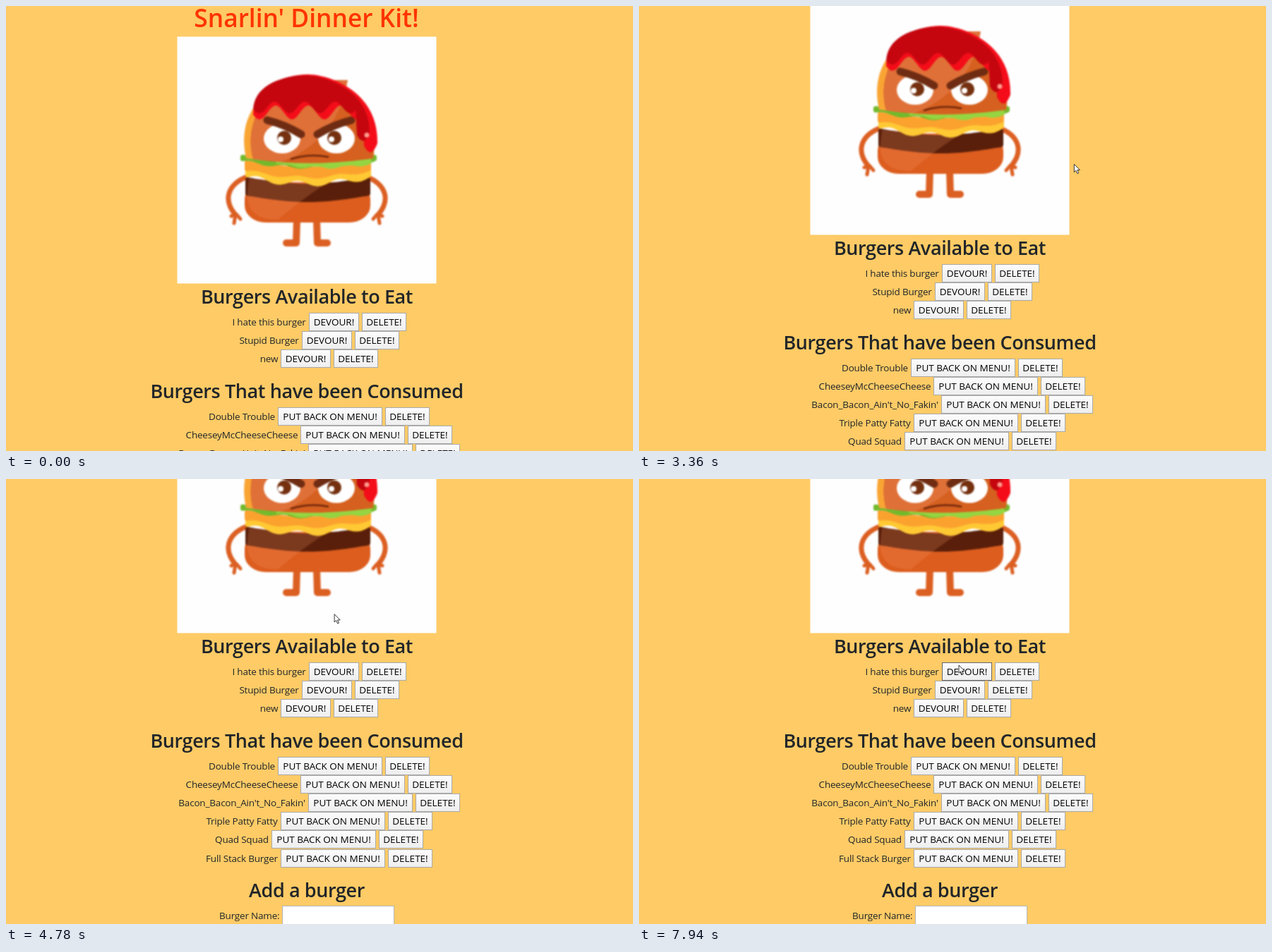
Write an HTML page that moves like this. It is 888 px wide and 631 px high and loops after 8000 ms.

```html
<!DOCTYPE html>
<html lang="en">
<head>
<meta charset="utf-8">
<title>Burger menu</title>
<style>
  html, body { margin: 0; width: 100%; height: 100%; overflow: hidden; background: #fecb66; }
  svg { display: block; width: 888px; height: 631px; }
  text { font: 13.5px "Open Sans", "Noto Sans", sans-serif; fill: #212529; }
  .label { letter-spacing: -.2px; }
  .head { font-size: 27px; font-weight: 600; letter-spacing: -.4px; text-anchor: middle; }
  .title { font-size: 35.3px; font-weight: 600; fill: #ff3300; text-anchor: middle; }
  .caption { fill: #000; text-anchor: middle; pointer-events: none; }
  .button { fill: url(#face); stroke: #a9a9a9; }
  .button.hover { stroke: #666; }
  #burger { filter: blur(.8px); }
  #bands path { stroke-width: 6; stroke-linejoin: round; }
  #cursor { pointer-events: none; }
  .line { fill: none; stroke-linecap: round; stroke-linejoin: round; }
</style>
</head>
<body>
<svg viewBox="0 0 888 631">
  <defs>
    <linearGradient id="face" x2="0" y2="1">
      <stop stop-color="#fcfcfc"/><stop offset="1" stop-color="#eeeeee"/>
    </linearGradient>
    <g id="limbs" class="line" stroke="#dc5f22">
      <path stroke-width="7" d="M339 243C314 254 307 275 325 296"/>
      <path stroke-width="5" d="M325 295L319 298M325 296L323 308M327 296L332 302"/>
      <path stroke-width="10" d="M412 303L411 336H397"/>
    </g>
    <g id="eye">
      <ellipse cx="391" cy="188" rx="26" ry="21" fill="#fff"/>
      <circle cx="394" cy="187" r="10" fill="#74300f"/>
      <path class="line" stroke="#6f2c12" stroke-width="11" d="M370 162Q395 168 418 182"/>
    </g>
  </defs>
  <g id="page">
    <text class="title" x="425.5" y="30">Snarlin' Dinner Kit!</text>
    <rect x="242.5" y="43.5" width="367" height="350" fill="#fefefe"/>
    <g id="burger">
      <use href="#limbs"/><use href="#limbs" transform="matrix(-1 0 0 1 852 0)"/>
      <rect x="338" y="250" width="178" height="57" rx="30" ry="24" fill="#dc5d1e"/>
      <g id="bands"></g>
      <path d="M340 216C325 150 370 105 430 105S530 150 520 216Q430 229 340 216Z" fill="#f9a534"/>
      <path d="M350 217C335 165 370 105 430 105S530 150 520 216Q430 229 350 217Z" fill="#d5601f"/>
      <path d="M350 217C335 165 370 105 430 105H484Q470 190 390 221Z" fill="#df7038"/>
      <use href="#eye"/><use href="#eye" transform="matrix(-1 0 0 1 859 0)"/>
      <g fill="#fff"><circle cx="389" cy="189" r="4"/><circle cx="461" cy="189" r="4"/></g>
      <path class="line" stroke="#70270c" stroke-width="2.5" d="M404 217Q430 209 456 214"/>
      <path id="sauce" fill="#f40d19"/>
      <use href="#glaze"/>
      <circle cx="511" cy="183" r="3.5" fill="#ff9a8c"/>
    </g>
    <text class="head" x="426" y="422">Burgers Available to Eat</text>
    <text class="head" x="426" y="555.5">Burgers That have been Consumed</text>
    <text class="head" x="426" y="767.5">Add a burger</text>
    <text class="label" x="302" y="798.5">Burger Name:</text>
    <rect x="391.5" y="780.5" width="158" height="26" fill="#fff" stroke="#b5b5b5"/>
  </g>
  <g id="cursor">
    <path id="arrow" d="M.5 .5V11.8L3 9.4L5 13.8L6.9 13L5 8.8H8.6Z" fill="#fff" stroke="#222" stroke-width=".9"/>
    <path id="beam" d="M-2.5 -5H2.5M0 -5V5M-2.5 5H2.5" fill="none" stroke="#4a4238"/>
  </g>
</svg>
<script>
const $ = id => document.getElementById(id);

function add(parent, tag, attrs, content = '') {
  const el = document.createElementNS('http://www.w3.org/2000/svg', tag);
  for (const k in attrs) el.setAttribute(k, attrs[k]);
  el.textContent = content;
  $(parent).append(el);
  return el;
}

// Points along a curve y(u), u from 0 to 1
function curve(x0, x1, y) {
  return Array.from({ length: 41 }, (_, i) => `${x0 + (x1 - x0) * i / 40} ${y(i / 40)}`).join('L');
}

// A filling that sags in the middle, with a rippled lower edge
function band(color, x0, x1, top, bottom, sag, ripples = 0, height = 0) {
  const bow = u => sag * Math.sin(Math.PI * u);
  const upper = curve(x0, x1, u => top + bow(u));
  const lower = curve(x1, x0, u => bottom + bow(u) + height * Math.sin(2 * Math.PI * ripples * u));
  add('bands', 'path', { d: `M${upper}L${lower}Z`, fill: color, stroke: color });
}

band('#5a1f0a', 342, 513, 246, 266, 9);
add('bands', 'path', { d: 'M344 245H465Q430 265 385 303Q338 303 342 262Z', fill: '#ffa070', opacity: .2 });
band('#ffc934', 342, 514, 232, 240, 9, 3, 4);
band('#fba22e', 341, 514, 222, 231, 9, 3, 2);
band('#72b92c', 335, 522, 214, 217, 9, 4, 2);
band('#94d541', 385, 515, 220, 221, 5, 3, 2);

// Sauce: a dome with regular drips
const drips = curve(505, 350, u => 151 - 10 * Math.cos((123 - 155 * u - 46) / 46 * 2 * Math.PI));
const dome = `M350 154C352 110 400 97 428 97S528 120 526 195Q517 218 507 198L${drips}Z`;
$('sauce').setAttribute('d', dome);
$('sauce').after(add('burger', 'path', { d: dome, fill: '#c5060f', transform: 'translate(23 17) scale(.935 .84)' }));

function button(x, y, width, caption) {
  add('page', 'rect', { class: 'button', x: x + .5, y: y + .5, width: width - 1, height: 25 });
  add('page', 'text', { class: 'caption', x: x + width / 2, y: y + 18 }, caption);
}

// Rows of a name and two buttons, centred on one axis
function list(top, action, width, names) {
  names.forEach((name, i) => {
    const y = Math.round(top + i * 26.2);
    const label = add('page', 'text', { class: 'label', y: y + 18 }, name);
    const nameWidth = label.getComputedTextLength();
    const left = 443.5 - (nameWidth + width + 71) / 2;
    label.setAttribute('x', left);
    const x = Math.round(left + nameWidth + 4);
    button(x, y, width, action);
    button(x + width + 4, y, 63, 'DELETE!');
  });
}

list(435, 'DEVOUR!', 71, ['I hate this burger', 'Stupid Burger', 'new']);
list(568.6, 'PUT BACK ON MENU!', 148, ['Double Trouble', 'CheeseyMcCheeseCheese',
  "Bacon_Bacon_Ain't_No_Fakin'", 'Triple Patty Fatty', 'Quad Squad', 'Full Stack Burger']);

// Two wheel notches, each easing out, shown in held steps
function scrollAt(t) {
  const held = 3280 + Math.floor((t - 3280) / 76.6) * 76.6;
  const notch = start => {
    const u = Math.min(1, Math.max(0, (held - start) / 340));
    return 87.5 * (1 - (1 - u) ** 4);
  };
  return Math.round(notch(3248) + notch(3815));
}

// Pointer key points: time, x, y
const moves = [[280, 806, 617], [1050, 375, 12], [1280, 375, 12], [1850, 519, 95], [2190, 414, 26],
  [2660, 536, 172], [3130, 616, 224], [4300, 615, 223], [4780, 465, 191], [5120, 324, 238],
  [5500, 440, 201], [5930, 538, 268], [6310, 455, 266], [6780, 455, 266], [6860, 393, 268],
  [7170, 367, 268], [7940, 452.5, 263.5]];

function pointerAt(t) {
  const i = moves.findIndex(m => m[0] > t);
  if (i < 0) return moves.at(-1).slice(1);
  const [t0, x0, y0] = moves[i - 1], [t1, x1, y1] = moves[i];
  const k = (t - t0) / (t1 - t0);
  return [x0 + (x1 - x0) * k, y0 + (y1 - y0) * k];
}

const show = (id, on) => $(id).style.display = on ? '' : 'none';

function draw() {
  const t = performance.now() % 8000;
  $('page').setAttribute('transform', `translate(0 ${-scrollAt(t)})`);
  document.querySelector('.hover')?.classList.remove('hover');
  const visible = t >= moves[0][0];
  show('cursor', visible);
  if (visible) {
    const [x, y] = pointerAt(t);
    const under = document.elementFromPoint(x, y);
    const onText = under?.tagName === 'text';
    if (under?.classList.contains('button')) under.classList.add('hover');
    $('cursor').setAttribute('transform', `translate(${x} ${y})`);
    show('beam', onText);
    show('arrow', !onText);
  }
  requestAnimationFrame(draw);
}
draw();
</script>
</body>
</html>
```
